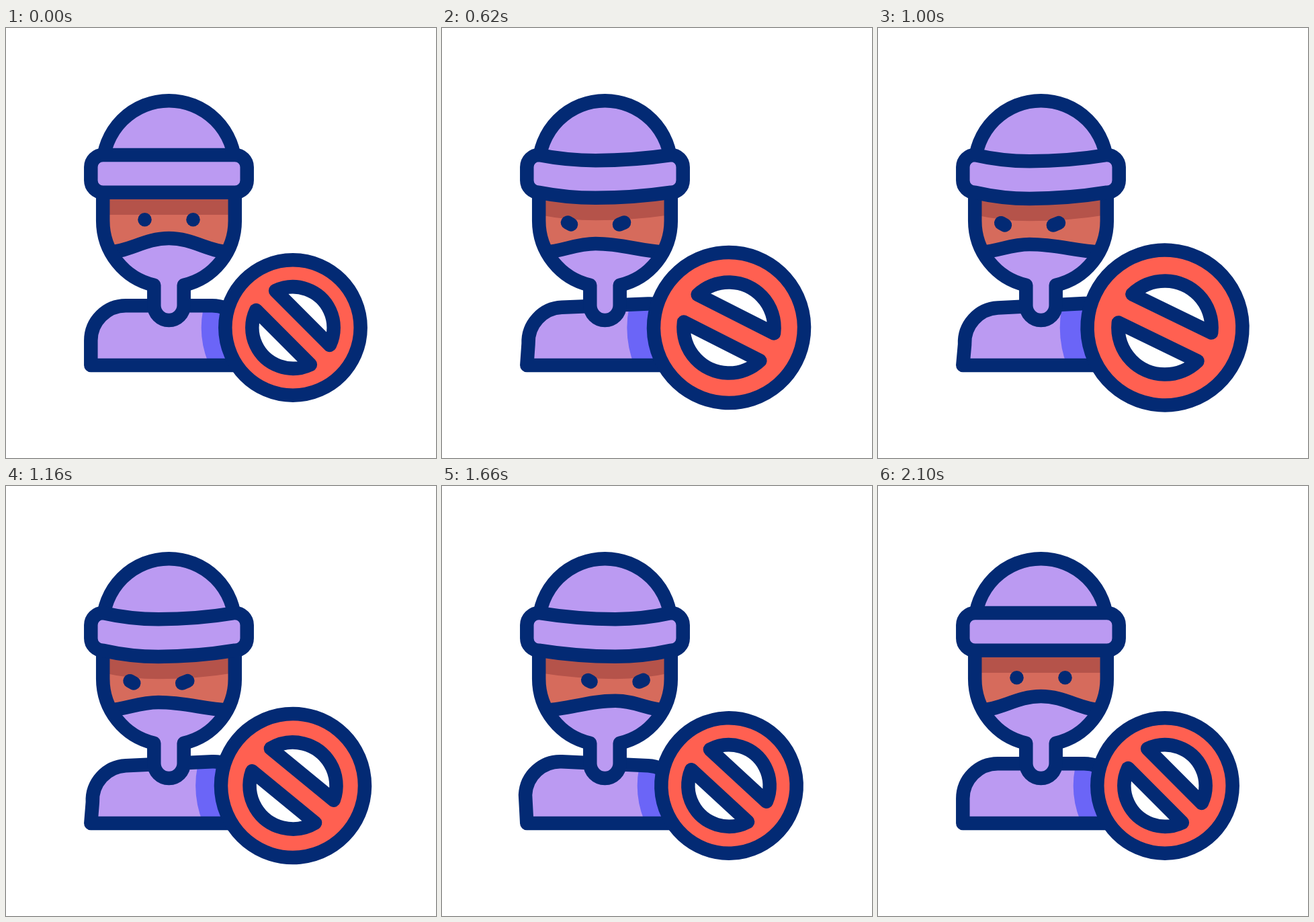
Write an HTML page with a canvas that moves like this. It is 640 by 640 pixels and loops after 2.4 s.

```html
<!DOCTYPE html>
<html lang="en">
<head>
<meta charset="utf-8">
<title>Masked figure with stop sign</title>
<style>
html, body { margin: 0; width: 100%; height: 100%; overflow: hidden; background: #fff; }
canvas { display: block; width: 100vw; height: 100vh; }
</style>
</head>
<body>
<canvas id="stage" width="640" height="640"></canvas>
<script>
const c = document.getElementById('stage').getContext('2d');
const LOOP = 2400, START = 105, END = 2090, W = 20.5, CX = 242.5, RAD = Math.PI / 180;
const NAVY = '#032a74', LILAC = '#bb9af2', SKIN = '#d66b5c', SHADE = '#b5534a',
      BLUE = '#6b65f7', RED = '#ff6051';

// Progress from 0 to 1 between two times: swing eases both ends, settle only the last.
const part = (t, a, b) => Math.min(1, Math.max(0, (t - a) / (b - a)));
const swing = (t, a, b) => (1 - Math.cos(Math.PI * part(t, a, b))) / 2;
const settle = (t, a, b) => 1 - (1 - part(t, a, b)) ** 2;

function pose(t) {
  const tense = settle(t, START, 900);
  return {
    look: -17 * settle(t, START, 1000) + 33 * swing(t, 1080, 1710) - 16 * swing(t, 1710, END),
    frown: tense - swing(t, 1450, END),
    sag: 9.3 * (tense - swing(t, 1620, END)),
    size: 1 + .155 * swing(t, START, 900) - .204 * swing(t, 940, 1410) + .049 * swing(t, 1410, 1660),
    turn: 45 - 20 * settle(t, START, 850) + 33 * swing(t, 950, 1410)
      - 16 * swing(t, 1410, 1700) + 3 * swing(t, 1700, 1950)
  };
}

function fill(color, path) {
  c.fillStyle = color;
  path ? c.fill(path) : c.fill();
}

function stroke(path) {
  c.strokeStyle = NAVY;
  c.lineWidth = W;
  path ? c.stroke(path) : c.stroke();
}

function body(tilt, size) {
  const cos = Math.cos(tilt), sin = Math.sin(tilt), top = 413.2, side = 116.2, r = 52, k = r * .448;
  const p = (x, y) => [CX + x * cos - y * sin, top + x * sin + y * cos];
  const b = new Path2D();
  b.moveTo(CX - side, 502);
  b.lineTo(...p(-side, r));
  b.bezierCurveTo(...p(-side, k), ...p(k - side, 0), ...p(r - side, 0));
  b.lineTo(...p(side - r, 0));
  b.bezierCurveTo(...p(side - k, 0), ...p(side, k), ...p(side, r));
  b.lineTo(CX + side, 502);
  b.closePath();
  fill(LILAC, b);
  c.save();
  c.clip(b);
  c.beginPath();
  c.arc(427, 446, 136.3 * size, 0, 7);
  fill(BLUE);
  c.restore();
  stroke(b);
}

// Sagging line between two x positions, lowest at mx.
function sagLine(x0, x1, y, mx, sag) {
  c.quadraticCurveTo((x0 + mx) / 2, y + sag, mx, y + sag);
  c.quadraticCurveTo((x1 + mx) / 2, y + sag, x1, y);
}

function maskLine(px, py) {
  const x0 = 154, x1 = 331, y = 333.5, l = px - x0, r = x1 - px;
  c.beginPath();
  c.moveTo(x0 - 15, y + 2);
  c.lineTo(x0, y);
  c.bezierCurveTo(x0 + l * .34, y - 1, px - l * .4, py, px, py);
  c.bezierCurveTo(px + r * .4, py, x1 - r * .34, y - 1, x1, y);
  c.lineTo(x1 + 15, y + 2);
}

function eye(x, y, dx, dy) {
  c.beginPath();
  c.moveTo(x - dx - .01, y - dy);
  c.lineTo(x + dx, y + dy);
  stroke();
}

function head({ look, frown, sag }) {
  const mx = CX + look, r = 98.3, neck = 22.2, a = Math.acos(neck / r);
  const outline = new Path2D();
  outline.moveTo(CX - r, 230);
  outline.arc(CX, 287, r, Math.PI, Math.PI - a, true);
  outline.arc(CX, 412.7, neck, Math.PI, 0, true);
  outline.arc(CX, 287, r, a, 0, true);
  outline.lineTo(CX + r, 230);
  fill(LILAC, outline);

  c.save();
  c.clip(outline);
  const peak = 313 + 9 * frown;
  maskLine(mx, peak);
  c.lineTo(345, 230);
  c.lineTo(140, 230);
  fill(SKIN);

  c.beginPath();
  c.moveTo(144, 230);
  c.lineTo(144, 278);
  sagLine(144, 341, 278, mx, sag);
  c.lineTo(341, 230);
  fill(SHADE);

  maskLine(mx, peak);
  stroke();
  const y = 285.2 + 6.6 * frown, half = 36 + 3.4 * frown;
  eye(mx - half, y, 2.9 * frown, 1.6 * frown);
  eye(mx + half, y, 4.1 * frown, -1.7 * frown);
  c.restore();
  stroke(outline);
}

function hat({ look, sag }) {
  const mx = CX + look, l = 126.3, r = 358.7, top = 189, low = 244.7, k = 18;
  c.beginPath();
  c.arc(CX, 206.5, 98.3, Math.PI, 0);
  fill(LILAC);
  stroke();

  c.beginPath();
  c.moveTo(l + k, top);
  sagLine(l + k, r - k, top, mx, sag);
  c.arcTo(r, top, r, top + k, k);
  c.arcTo(r, low, r - k, low, k);
  sagLine(r - k, l + k, low, mx, sag);
  c.arcTo(l, low, l, low - k, k);
  c.arcTo(l, top, l + k, top, k);
  c.closePath();
  fill(LILAC);
  stroke();
}

function sign({ size, turn }) {
  c.save();
  c.translate(427, 446);
  c.rotate(turn * RAD);
  c.beginPath();
  c.arc(0, 0, 100.7 * size, 0, 7);
  fill(RED);
  stroke();
  const r = 60.7 * size, a = Math.asin(20.5 / 60.7);
  for (const start of [0, Math.PI]) {
    c.beginPath();
    c.arc(0, 0, r, start + a, start + Math.PI - a);
    c.closePath();
    fill('#fff');
    stroke();
  }
  c.restore();
}

function draw(t) {
  const now = pose(t);
  c.fillStyle = '#fff';
  c.fillRect(0, 0, 640, 640);
  c.lineJoin = c.lineCap = 'round';
  body(now.look * .17 * RAD, now.size);
  head(now);
  hat(now);
  sign(now);
}

const begin = performance.now();
function tick() {
  draw((performance.now() - begin) % LOOP);
  requestAnimationFrame(tick);
}
tick();
</script>
</body>
</html>
```
